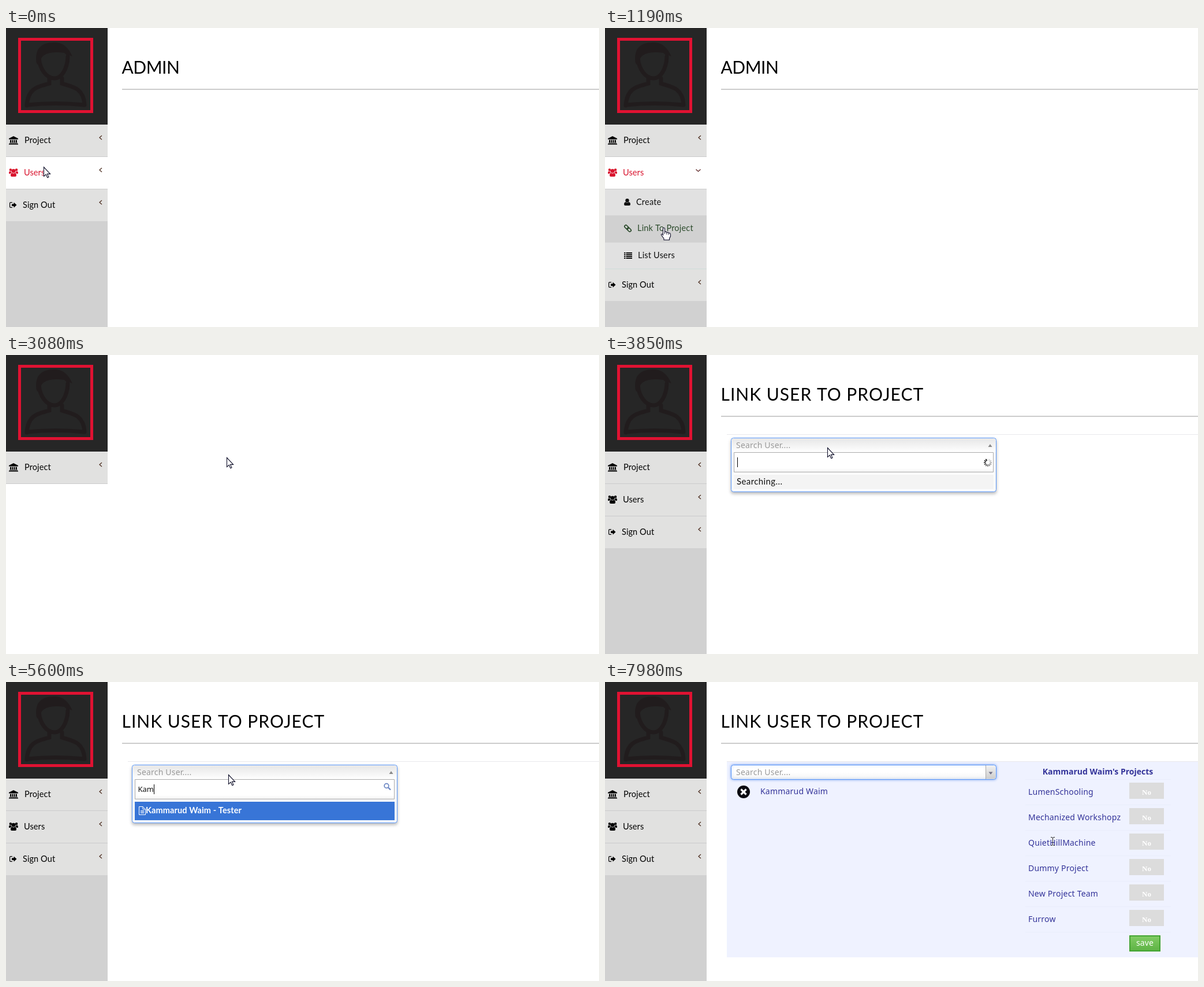
Animation of 1027 by 517 pixels, one loop 8 s. Source, as an HTML page with a canvas:

```html
<!DOCTYPE html>
<html lang="en">
<head>
<meta charset="utf-8">
<title>Link user to project</title>
<style>
html, body { margin: 0; width: 100%; height: 100%; overflow: hidden; background: #fff; }
canvas { display: block; }
</style>
</head>
<body>
<canvas id="stage" width="1027" height="517"></canvas>
<script>
const ctx = document.getElementById('stage').getContext('2d');
const LOOP = 8000, TICK = 70;
const MENU = '14.5px Lato, sans-serif';
const TITLE = '30px Lato, sans-serif';
const BODY = '14px "Noto Sans", sans-serif';
const RED = '#d9152f', BLUE = '#3875d7', FOCUS = '#5897fb';

const USER = 'Kammarud Waim';
const PEOPLE = [USER, 'Delia Foxworn', 'Hari Pellanta', 'Joan Brisketh', 'Lena Quarrow', 'Omar Tindlay', 'Ruth Vannick'];
const PROJECTS = ['LumenSchooling', 'Mechanized Workshopz', 'QuietHillMachine', 'Dummy Project', 'New Project Team', 'Furrow'];

// time, x, y of the pointer
const TRACK = [
  [0, 65, 240], [490, 65, 240], [980, 101, 341], [1190, 102, 345],
  [2870, 102, 345], [2940, 382, 177], [3080, 382, 177], [3150, 391, 169],
  [3220, 391, 169], [3430, 381, 163], [3500, 385, 160],
  [5950, 385, 160], [6580, 385, 228], [7490, 385, 228], [7980, 775, 275]
];

const disc = (x, y, r) => `M${x - r} ${y}a${r} ${r} 0 1 0 ${2 * r} 0a${r} ${r} 0 1 0 ${-2 * r} 0Z`;
const shape = d => new Path2D(d);
const ICONS = {
  bank: shape('M8 0L16 4V5.5H0V4ZM2 6.5H4.2V11H2ZM5.4 6.5H7.4V11H5.4ZM8.6 6.5H10.6V11H8.6ZM11.8 6.5H14V11H11.8ZM1 11.5H15V12.5H1ZM0 13H16V14.5H0Z'),
  users: shape(disc(8, 4.2, 3.4) + disc(2.9, 2.3, 2.2) + disc(13.1, 2.3, 2.2) +
    'M3 12Q3 7.8 5.5 7.6Q8 9.4 10.5 7.6Q13 7.8 13 12Q13 14 11 14H5Q3 14 3 12Z' +
    'M0 7.5Q0 4.8 1.5 4.8L4.2 5.6L4.8 7Q3 7.4 2.6 9H1Q0 9 0 7.5Z' +
    'M16 7.5Q16 4.8 14.5 4.8L11.8 5.6L11.2 7Q13 7.4 13.4 9H15Q16 9 16 7.5Z'),
  exit: shape('M5 0H2Q0 0 0 2V8Q0 10 2 10H5V8.8H2Q1.2 8.8 1.2 8V2Q1.2 1.2 2 1.2H5ZM4 3.2H7.5V.5L12.5 5L7.5 9.7V7H4Z'),
  user: shape(disc(5.5, 3.2, 3.2) + 'M0 10Q0 6 3 6Q5.5 8 8 6Q11 6 11 10Q11 12 9 12H2Q0 12 0 10Z'),
  list: shape([0, 3, 6, 9].map(y => `M0 ${y}h2.4v2h-2.4ZM3.5 ${y}h10.5v2h-10.5Z`).join('')),
  file: shape('M.5 .5H7L11.5 5V14.5H.5ZM7 .5V5H11.5M3 7.5H9M3 9.5H9M3 11.5H9')
};
const ARROW = shape('M.5 .5V16.5L4.2 13.2L6.8 18.7L9 17.7L6.5 12.4H11.6Z');
const HAND = shape('M-1.5 13V1.5Q-1.5 .5 0 .5T1.5 1.5V7.5Q4 6.5 5 8.5Q7.5 7.5 8.3 9.5Q11.5 9 11.5 12V15L9.5 19V21.5H0V19L-4.5 13Q-5 10.5 -2.5 11.5Z');

function box(x, y, w, h, fill) {
  ctx.fillStyle = fill;
  ctx.fillRect(x, y, w, h);
}

function text(s, x, y, font, color, gap = 0, align = 'left') {
  ctx.font = font;
  ctx.fillStyle = color;
  ctx.letterSpacing = gap + 'px';
  ctx.textAlign = align;
  ctx.fillText(s, x, y);
  return ctx.measureText(s).width;
}

function line(color, width, ...pts) {
  ctx.strokeStyle = color;
  ctx.lineWidth = width;
  ctx.beginPath();
  for (let i = 0; i < pts.length; i += 2) ctx.lineTo(pts[i], pts[i + 1]);
  ctx.stroke();
}

function round(x, y, w, h, r, fill, stroke) {
  ctx.beginPath();
  ctx.roundRect(x + .5, y + .5, w - 1, h - 1, r);
  ctx.fillStyle = fill;
  ctx.fill();
  if (!stroke) return;
  ctx.strokeStyle = stroke;
  ctx.lineWidth = 1;
  ctx.stroke();
}

function gradient(y0, y1, ...stops) {
  const g = ctx.createLinearGradient(0, y0, 0, y1);
  stops.forEach((c, i) => g.addColorStop(i / (stops.length - 1), c));
  return g;
}

function place(x, y, draw) {
  ctx.save();
  ctx.translate(x, y);
  draw();
  ctx.restore();
}

function icon(name, x, y, color) {
  place(x, y, () => {
    ctx.fillStyle = ctx.strokeStyle = color;
    ctx.lineWidth = 1;
    if (name === 'file') ctx.stroke(ICONS.file);
    else ctx.fill(ICONS[name]);
  });
}

function glow(color, blur, dy, draw) {
  ctx.save();
  ctx.shadowColor = color;
  ctx.shadowBlur = blur;
  ctx.shadowOffsetY = dy;
  draw();
  ctx.restore();
}

function triangle(x, y, h, color) {
  ctx.fillStyle = color;
  ctx.beginPath();
  ctx.moveTo(x - 3.5, y);
  ctx.lineTo(x + 3.5, y);
  ctx.lineTo(x, y + h);
  ctx.fill();
}

const ease = p => p * p * (3 - 2 * p);
const within = (t, a, b) => t >= a && t < b;

function pointer(t) {
  const i = TRACK.findIndex(k => k[0] > t);
  if (i < 0) return TRACK[TRACK.length - 1].slice(1);
  const [t0, x0, y0] = TRACK[i - 1], [t1, x1, y1] = TRACK[i];
  const p = ease((t - t0) / (t1 - t0));
  return [Math.round(x0 + (x1 - x0) * p), Math.round(y0 + (y1 - y0) * p)];
}

function drawPointer(t, [x, y]) {
  const hand = within(t, 490, 2660) && y > 282 || within(t, 5600, 7070) && y >= 207;
  const beam = within(t, 5600, 7070) && within(y, 168, 203) || t >= 7560 && x > 728;
  place(x, y, () => {
    if (beam) {
      line('#222', 1, -3, -6.5, -1, -6.5, .5, -5.5, .5, 6.5, -1, 7.5, -3, 7.5);
      line('#222', 1, 4, -6.5, 2, -6.5, .5, -5.5, .5, 6.5, 2, 7.5, 4, 7.5);
      return;
    }
    const path = hand ? HAND : ARROW;
    ctx.fillStyle = '#fff';
    ctx.strokeStyle = '#10102a';
    ctx.lineWidth = 1.1;
    ctx.fill(path);
    ctx.stroke(path);
    if (hand) {
      line('#10102a', 1, 1.5, 7, 1.5, 11);
      line('#10102a', 1, 5, 8.5, 5, 12);
      line('#10102a', 1, 8.3, 9.5, 8.3, 12.5);
    }
  });
}

function avatar() {
  box(0, 0, 176, 167, '#262626');
  ctx.strokeStyle = ctx.fillStyle = '#211c1d';
  ctx.lineWidth = 7;
  ctx.lineCap = 'round';
  ctx.stroke(shape('M57 52C59 73 71 87 84 87C97 87 106 70 107 50M75 87V96C58 101 38 102 36 134M97 87V96C112 101 134 102 136 132M37 133Q85 128 136 133'));
  ctx.fill(shape('M53 61C49 36 61 25 83 25C98 25 107 32 115 49L109 47L108 60Q107 47 101 43Q77 40 66 47Q57 53 58 66Z'));
  ctx.lineCap = 'butt';
  ctx.strokeStyle = '#e01232';
  ctx.lineWidth = 5;
  ctx.strokeRect(23.5, 19.5, 125, 125);
}

function menuRow(y, name, label, x, active, open) {
  const color = active ? RED : '#000';
  box(0, y, 176, 56, active ? '#fff' : '#e1e1e0');
  box(0, y + 55, 176, 1, '#cbcbcb');
  icon(name, name === 'exit' ? 6 : 5, y + (name === 'exit' ? 22 : 20), color);
  text(label, x, y + 32, MENU, color, .1);
  const cy = y + 22.5;
  if (open) line('#5a2020', 1.2, 157.5, cy - 1, 161.5, cy + 2.5, 165.5, cy - 1);
  else line('#4a2a1c', 1.2, 166, cy - 3.5, 162, cy, 166, cy + 3.5);
}

function subRow(y, h, name, label, x, hover, active) {
  const color = active ? RED : hover ? '#2b4a2b' : '#111';
  box(0, y, 176, h, active ? '#fff' : hover ? '#d1d1d1' : '#e1e1e1');
  if (name === 'link') {
    place(39.5, y + 22.5, () => {
      ctx.rotate(Math.PI / 4);
      ctx.strokeStyle = color;
      ctx.lineWidth = 1.7;
      for (const lx of [-7, -.8]) {
        ctx.beginPath();
        ctx.roundRect(lx, -2.3, 7.8, 4.6, 2.2);
        ctx.stroke();
      }
    });
  } else icon(name, 33, y + (name === 'user' ? 16 : 17), color);
  text(label, x, y + 27, MENU, color, .2);
}

function sidebar(t, [px, py]) {
  avatar();
  if (within(t, 3010, 3150)) {
    menuRow(167, 'bank', 'Project', 32);
    return;
  }
  box(0, 167, 176, 350, '#d1d1d1');
  menuRow(167, 'bank', 'Project', 32);
  const grow = t < 3010 ? Math.round(138 * ease(Math.min(1, Math.max(0, (t - 140) / 420)))) : 0;
  menuRow(223, 'users', 'Users', 31, t < 2520, grow > 0);
  if (grow) {
    const over = (y, h) => px < 176 && within(py, y, y + h);
    ctx.save();
    ctx.beginPath();
    ctx.rect(0, 279, 176, grow);
    ctx.clip();
    subRow(279, 45, 'user', 'Create', 54, over(279, 45));
    subRow(324, 47, 'link', 'Link To Project', 56, over(324, 47), t >= 2520);
    subRow(371, 45, 'list', 'List Users', 57, false);
    box(0, 416, 176, 1, '#cfdcd9');
    ctx.restore();
  }
  menuRow(279 + grow, 'exit', 'Sign Out', 29);
  box(0, 334 + grow, 176, 1, '#d1d1d1');
}

function heading(label, gap) {
  text(label, 200.5, 79, TITLE, '#000', gap);
  box(201, 105, 826, 2, '#ccc');
}

function closedSelect(focused) {
  const paint = () => round(218, 143, 460, 26, 4, gradient(143, 169, '#fff', '#fff', '#f3f3f3'), focused ? FOCUS : '#aaa');
  if (focused) glow('rgba(60,120,230,.6)', 4, 0, paint);
  else paint();
  round(659, 144, 18, 24, [0, 3, 3, 0], gradient(144, 168, '#f2f2f2', '#ccc'));
  box(659, 144, 1, 24, '#aaa');
  triangle(668, 155.5, 4.5, '#707088');
  text('Search User....', 227, 161, BODY, '#999', .2);
}

function spinner(step) {
  place(663, 186, () => {
    for (let i = 0; i < 12; i++) {
      const a = (i + step - 3) * Math.PI / 6, c = Math.cos(a), s = Math.sin(a);
      line(`rgba(0,0,0,${.08 + .9 * i / 11})`, 1.7, 3.5 * c, 3.5 * s, 7 * c, 7 * s);
    }
  });
}

function magnifier() {
  ctx.strokeStyle = '#6d88c4';
  ctx.lineWidth = 1.8;
  ctx.beginPath();
  ctx.arc(659, 179.5, 3.8, 0, 7);
  ctx.stroke();
  line('#6d88c4', 2.4, 662, 182.5, 666, 186.5);
}

function personRow(name, y, lit, width) {
  if (lit) box(223, y, width, 32, BLUE);
  const color = lit ? '#fff' : '#111';
  icon('file', 230, y + 8, color);
  text(name + ' - Tester', 242, y + 20, 'bold 14.5px Lato, sans-serif', color, .1);
}

function results(t) {
  if (t < 4060) {
    box(223, 207, 450, 25, '#f4f4f4');
    text('Searching...', 228, 224, '15px Lato, sans-serif', '#111', .4);
  } else if (t < 5600) {
    ctx.save();
    ctx.beginPath();
    ctx.rect(223, 207, 450, 200);
    ctx.clip();
    PEOPLE.forEach((p, i) => personRow(p, 207 + 32 * i, !i && t < 4830, 433));
    box(656, 207, 17, 200, '#f1f1f1');
    box(658, 224, 13, 90, '#c1c1c1');
    triangle(664.5, 217, -4, '#505050');
    triangle(664.5, 397, 4, '#505050');
    ctx.restore();
  } else personRow(USER, 207, true, 450);
}

function openSelect(t) {
  const bottom = t < 4060 ? 237 : t < 5600 ? 412 : 244;
  glow('rgba(0,0,0,.25)', 5, 3, () => round(218, 143, 460, bottom - 143, 4, '#fff', FOCUS));
  round(219, 144, 458, 24, [3, 3, 0, 0], gradient(144, 168, '#e6e6e6', '#fff'));
  triangle(667, 159, -5, '#888');
  text('Search User....', 227, 161, BODY, '#999', .2);
  round(223, 168, 450, 35, 0, gradient(168, 203, '#fff', '#fff', '#fff', '#fff', '#fff', '#f0f0f0'), '#aaa');

  const typed = USER.slice(0, [4760, 5040, 5250].filter(k => t >= k).length);
  const w = text(typed, 228.5, 190, '13px "Noto Sans", sans-serif', '#111');
  const caretOff = within(t, 4340, 4760) || within(t, 6020, 6440) || within(t, 6790, 6860);
  if (!caretOff) box(Math.round(229 + w), 177, 1, 17, '#000');

  if (t < 4060) spinner(t < 3920 ? 0 : 1);
  else if (within(t, 4830, 5600)) spinner(Math.max(0, (t - 4900) / TICK));
  else magnifier();
  results(t);
}

function chosen(ink) {
  ctx.fillStyle = '#0b0b10';
  ctx.beginPath();
  ctx.arc(240, 190, 11, 0, 7);
  ctx.fill();
  line('#fff', 3.2, 235.5, 185.5, 244.5, 194.5);
  line('#fff', 3.2, 244.5, 185.5, 235.5, 194.5);
  text(USER, 269, 194, BODY, ink, .2);
}

function projects(ink) {
  text(USER + "'s Projects", 853.5, 160, 'bold ' + BODY, ink, 0, 'center');
  PROJECTS.forEach((p, i) => {
    const y = 168 + 44 * i;
    box(728, y, 252, 1, '#e9edfb');
    text(p, 733, y + 27, BODY, ink, .2);
    box(908, y + 6, 60, 28, '#dcdcdc');
    text('No', 938, y + 27, 'bold 13px "Liberation Serif", serif', '#fff', 0, 'center');
  });
  box(728, 432, 252, 1, '#e9edfb');
  box(908, 438, 54, 28, '#43a532');
  box(910, 440, 50, 24, gradient(440, 464, '#80cb62', '#5fb446'));
  text('save', 935, 456, BODY, '#fff', .1, 'center');
}

function linkPage(t) {
  const hover = t >= 7560;
  const ink = hover ? '#333399' : '#666699';
  if (hover) box(211, 137, 816, 339, '#eff2ff');
  heading('LINK USER TO PROJECT', 1);
  box(211, 137, 816, 1, '#e8e8ec');
  if (within(t, 3850, 7070)) openSelect(t);
  else closedSelect(t >= 7070);
  if (t >= 7070) chosen(hover ? ink : '#556099');
  if (t >= 7210) projects(ink);
}

function draw(now) {
  const t = Math.floor(now % LOOP / TICK) * TICK;
  const at = pointer(t);
  box(0, 0, 1027, 517, '#fff');
  if (t < 2940) heading('ADMIN', -.5);
  else if (t >= 3150) linkPage(t);
  sidebar(t, at);
  drawPointer(t, at);
}

let start;
function frame(now) {
  start ??= now;
  draw(now - start);
  requestAnimationFrame(frame);
}
draw(0);
requestAnimationFrame(frame);
</script>
</body>
</html>
```
